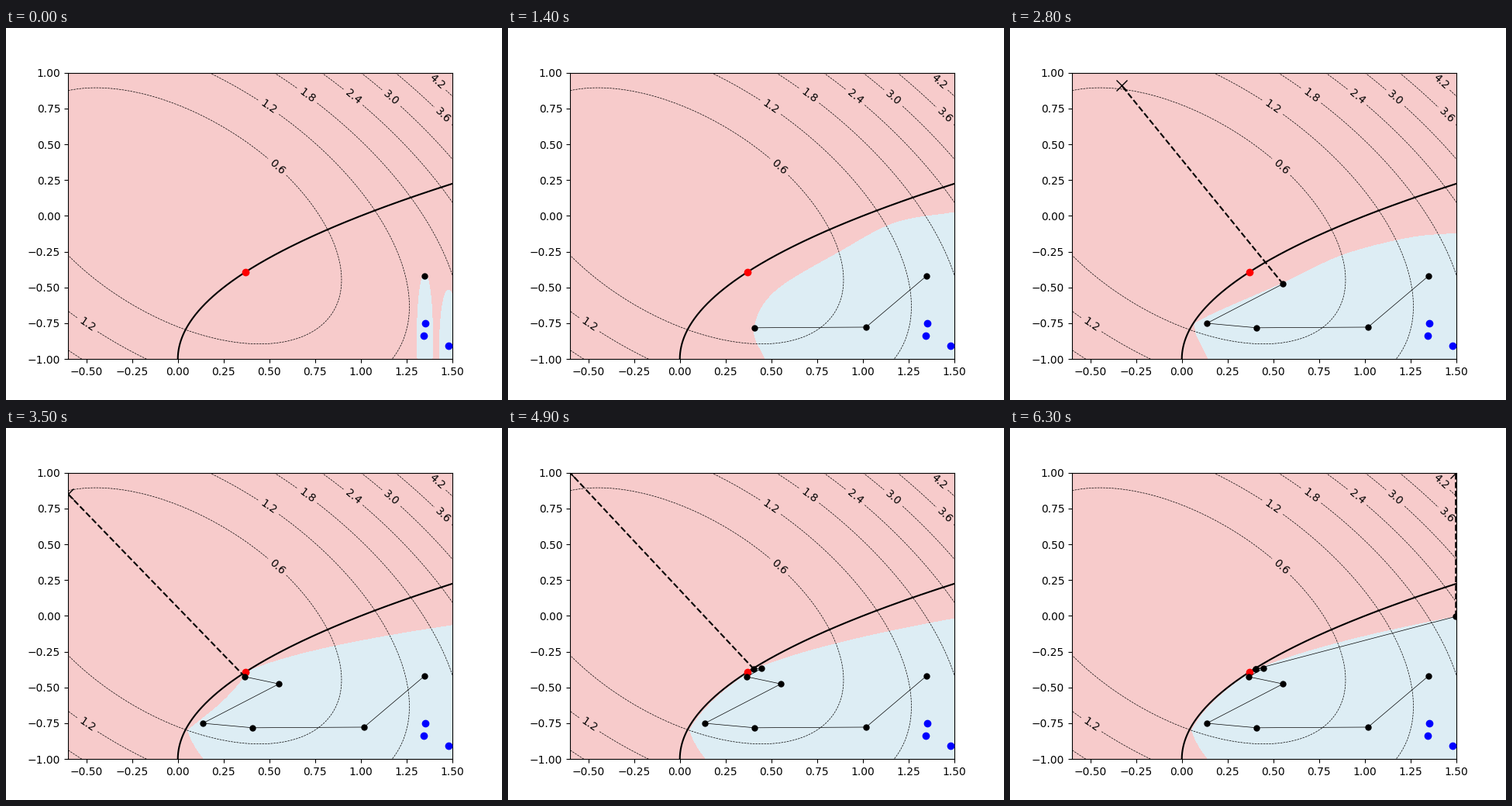
A matplotlib script for the animation above (7 s loop, 640 by 480 pixels).

```python
import numpy as np
import matplotlib.pyplot as plt
from matplotlib.animation import FuncAnimation
from matplotlib.patches import Polygon

PINK = (247 / 255, 203 / 255, 203 / 255)
PALE = (221 / 255, 237 / 255, 244 / 255)
X0, X1, Y0, Y1 = -0.6, 1.5, -1.0, 1.0
STEPS = 10


def to_data(pts):
    """Stage pixels (y down) to axes coordinates."""
    p = np.asarray(pts, float)
    x = X0 + (p[:, 0] - 80) / 496 * (X1 - X0)
    y = Y1 - (p[:, 1] - 57.6) / 369.6 * (Y1 - Y0)
    return np.column_stack([x, y])


def smooth(pts, n=16):
    """Catmull-Rom curve through the points."""
    p = np.asarray(pts, float)
    p = np.vstack([2 * p[0] - p[1], p, 2 * p[-1] - p[-2]])
    t = np.linspace(0, 1, n)[:, None]
    return np.vstack([0.5 * (2 * b + (c - a) * t
                             + (2 * a - 5 * b + 4 * c - d) * t**2
                             + (3 * b - a - 3 * c + d) * t**3)
                      for a, b, c, d in zip(p, p[1:], p[2:], p[3:])])


def blob_shape(cx, cy, rx, ry):
    a = np.linspace(0, 2 * np.pi, 120)
    return to_data(np.column_stack([cx + rx * np.cos(a), cy + ry * np.sin(a)]))


def limit(y):
    """True constraint boundary."""
    return (1 + y)**2


def closed(edge):
    """Close a boundary around the lower right corner."""
    return np.vstack([edge, [(1.51, edge[-1, 1]), (1.51, -1.01),
                             (edge[0, 0], -1.01)]])


def learned(k):
    """Known region late in the search: hugs the limit between the visited
    heights and falls away from it outside them."""
    low, top = -0.8, -0.38
    end = -0.122 * 0.55**(k - 4)
    y = np.linspace(-1, end, 200)
    above = np.maximum(y - top, 0)
    below = np.maximum(low - y, 0)
    mid = np.clip((y - low) / (top - low), 0, 1)
    bend = (X1 - limit(end) - 0.015 - 0.58 * (end - top)) / (end - top)**2
    gap = (0.015 + 0.65 * below + 0.58 * above + bend * above**2
           + 0.07 * 0.2**(k - 5) * np.sin(np.pi * mid))
    return closed(np.column_stack([limit(y) + gap, y]))


# Early regions follow a few key points each.
early = [
    [(451, 427), (463, 390), (484, 328), (497, 282), (522, 255.5),
     (576, 244)],
    [(332, 427), (318, 388), (345, 340), (430, 288), (500, 251.5),
     (576, 238)],
    [(268, 427), (252, 388), (292, 357), (360, 326), (460, 284),
     (576, 263)],
    [(256, 427), (239, 388), (254, 373), (352, 329.5), (430, 293),
     (515, 271), (576, 265)],
]
regions = [blob_shape(540.5, 400, 10, 82)]
regions += [closed(to_data(smooth(e))) for e in early]
regions += [learned(k) for k in range(len(regions), STEPS)]
side_blob = blob_shape(571, 411, 11.5, 73)

visited = to_data([(540, 320), (462, 386), (318, 386.8), (254, 381),
                   (352.2, 330.2), (308.2, 321), (327.2, 310.2),
                   (317.2, 311), (317.2, 311), (575.3, 243.2)])
# Proposed next positions, by step; the late ones sit in the corners.
goals = {k: (X0, Y1) for k in (6, 7, 8)}
goals.update(zip((1, 3, 4, 5, 9),
                 to_data([(426.2, 378.2), (148, 335), (143.8, 73.9),
                          (80, 85.2), (575.2, 57.6)])))
samples = to_data([(541, 380.8), (539, 397.2), (571, 410)])

fig, ax = plt.subplots(figsize=(6.4, 4.8), dpi=100)
ax.set_facecolor(PINK)
look = dict(fc=PALE, ec='none', aa=False, zorder=1)
blob = ax.add_patch(Polygon(regions[0], **look))
blob2 = ax.add_patch(Polygon(side_blob, **look))
ax.set_xlim(X0, X1)
ax.set_ylim(Y0, Y1)
ax.set_xticks(np.arange(-0.5, 1.51, 0.25))
ax.set_yticks(np.arange(-1, 1.01, 0.25))

# Objective and its level lines
gx, gy = np.meshgrid(np.linspace(X0, X1, 100), np.linspace(Y0, Y1, 100))
levels = ax.contour(gx, gy, gx**2 + gx * gy + gy**2,
                    levels=0.6 * np.arange(1, 8), colors='k',
                    linestyles='dashed', linewidths=0.5, zorder=2)
spots = to_data([(351, 178), (340, 101), (389.5, 86), (449, 88),
                 (497.5, 90), (565, 112), (556.5, 68.5), (105.5, 382)])
ax.clabel(levels, fmt='%.1f', fontsize=10, manual=[tuple(s) for s in spots])

# Constraint and the best point on it
y = np.linspace(-1, 0.3, 300)
ax.plot(limit(y), y, 'k', lw=1.5, zorder=3)
roots = np.roots([4, 3, 0, -2])
u = roots[np.abs(roots.imag) < 1e-9].real[0]
ax.plot(u**2, u - 1, 'ro', ms=6, zorder=4)
ax.plot(*samples.T, 'bo', ms=6, zorder=4)

trail, = ax.plot([], [], 'k-o', lw=0.5, ms=5, zorder=5)
step, = ax.plot([], [], 'k--', lw=1.5, zorder=5)
cross, = ax.plot([], [], 'kx', ms=10, zorder=5)


def update(k):
    blob.set_xy(regions[k])
    blob2.set_visible(k == 0)
    trail.set_data(*visited[:k + 1].T)
    line = np.array([visited[k], goals[k]]) if k in goals else np.empty((0, 2))
    step.set_data(*line.T)
    cross.set_data(*line[1:].T)
    return blob, blob2, trail, step, cross


anim = FuncAnimation(fig, update, frames=STEPS, interval=700,
                     init_func=lambda: update(0), repeat=True, repeat_delay=0)
plt.show()
```
